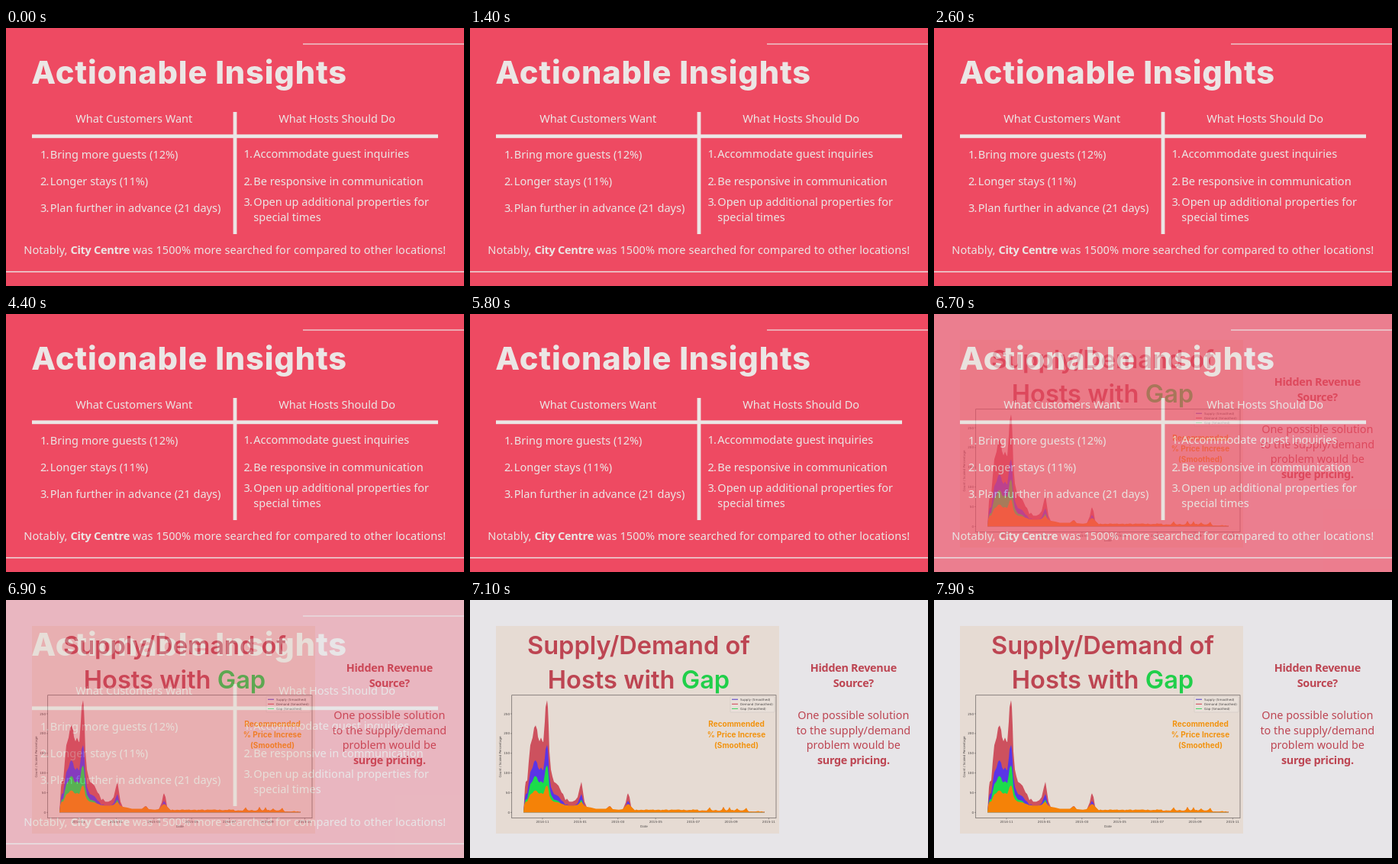
These frames come from a looping animation (600x338 px, 8 s). An HTML page:

```html
<!DOCTYPE html>
<html lang="en">
<head>
<meta charset="utf-8">
<title>Actionable Insights</title>
<style>
  html, body { margin: 0; width: 100%; height: 100%; overflow: hidden; background: #ee4a62; }
  svg { display: block; width: 100vw; height: 100vh; }
  text { white-space: pre; }
  .body { font: 14.55px "Noto Sans", "Open Sans", sans-serif; }
  .aside { font-size: 14.4px; }
  .number { letter-spacing: -.8px; }
  .bold { font-weight: 700; letter-spacing: -.02em; }
  .head { font: 800 41.5px Inter, sans-serif; letter-spacing: .85px; }
  .chart-head { font: 600 32.6px Inter, sans-serif; }
  .note { font: 700 10px Inter, sans-serif; }
  .tiny { font: 4.1px "DejaVu Sans", sans-serif; }
  .mid { text-anchor: middle; }
  .end { text-anchor: end; }
</style>
</head>
<body>
<svg id="stage" viewBox="0 0 600 338">
  <g id="insights">
    <rect width="600" height="338" fill="#ee4a62"/>
    <g fill="#ebe6e5">
      <rect x="389" y="20.4" width="211" height="1.2"/>
      <rect y="318.7" width="600" height="1.4"/>
      <rect x="34" y="139.4" width="532" height="4.8"/>
      <rect x="297.6" y="110" width="4.8" height="160"/>
    </g>
  </g>
  <g id="revenue" opacity="0">
    <rect width="600" height="338" fill="#e7e5e8"/>
    <rect x="34" y="34" width="371" height="272" fill="#e6dbd3"/>
    <g id="chart"></g>
  </g>
</svg>
<script>
const NS = 'http://www.w3.org/2000/svg';
const LOOP = 8000, STEP = 100;
const FADE_START = 6520, FADE_END = 7060;
const LIGHT = '#ebe6e5', ROSE = '#bd4552', INK = '#4a4646';
const insights = document.getElementById('insights');
const revenue = document.getElementById('revenue');
const chart = document.getElementById('chart');

function add(parent, tag, attrs, content) {
  const node = document.createElementNS(NS, tag);
  for (const key in attrs) node.setAttribute(key, attrs[key]);
  if (content) node.textContent = content;
  parent.appendChild(node);
  return node;
}

function label(parent, content, x, y, cls, fill) {
  return add(parent, 'text', { x, y, class: cls, fill }, content);
}

function buildInsights() {
  const put = (s, x, y, cls = 'body') => label(insights, s, x, y, cls, LIGHT);
  const item = (n, s, x, y) => {
    put(n + '.', x - 12.9, y, 'body number');
    put(s, x, y);
  };
  put('Actionable Insights', 33.2, 73, 'head');
  put('What Customers Want', 167.8, 124, 'body mid');
  put('What Hosts Should Do', 433.7, 124, 'body mid');
  item(1, 'Bring more guests (12%)', 57.8, 170.7);
  item(2, 'Longer stays (11%)', 57.8, 206);
  item(3, 'Plan further in advance (21 days)', 57.8, 241.4);
  item(1, 'Accommodate guest inquiries', 324.3, 170.3);
  item(2, 'Be responsive in communication', 324.3, 205.7);
  item(3, 'Open up additional properties for', 324.3, 233.1);
  put('special times', 324.3, 252.5);

  const line = put('', 299.8, 296.4, 'body mid');
  line.style.letterSpacing = '.07px';
  add(line, 'tspan', {}, 'Notably, ');
  add(line, 'tspan', { class: 'bold' }, 'City Centre');
  add(line, 'tspan', {}, ' was 1500% more searched for compared to other locations!');
}

// Demand outline as x, height above the zero line
const demand = [
  70, 0, 71, 16, 72, 33, 73, 40, 75, 42, 77, 67, 79, 88, 82, 98, 84, 111, 86, 114,
  88, 108, 89, 99, 91, 93, 93, 98, 95, 93, 96, 92, 98, 119, 99, 138, 101, 147, 102, 138,
  103, 113, 104, 80, 106, 56, 108, 47, 110, 40, 113, 38, 116, 35, 120, 26, 122, 24,
  125, 16, 127, 18, 130, 14, 134, 14, 138, 16, 141, 20, 144, 33, 146, 40, 148, 27,
  150, 14, 153, 7, 158, 5.5, 165, 4, 178, 4, 182, 8, 184, 8, 187, 3.5, 195, 3,
  200, 3.5, 204, 13, 206, 23, 207, 25, 209, 20, 211, 8, 214, 4
];

function outline() {
  const pts = [];
  for (let i = 0; i < demand.length; i += 2) pts.push([demand[i], demand[i + 1]]);
  const bumps = [[314, 4], [332, 5], [340, 3.5], [350, 2], [362, 3]];
  let seed = 7;
  for (let x = 216; x <= 386; x += 2) {
    seed = (seed * 16807) % 2147483647;
    const noise = (seed / 2147483647 - .5) * 1.1;
    const base = x < 300 ? 2.8 : x < 364 ? 2.2 : 1;
    const bump = bumps.reduce((sum, [c, h]) => sum + h * Math.exp(-(((x - c) / 1.6) ** 2)), 0);
    pts.push([x, Math.max(.4, base + noise + bump)]);
  }
  return pts;
}

function area(pts, height, fill) {
  const top = pts.map(([x, h]) => `L${x} ${(278.3 - height(h)).toFixed(2)}`).join('');
  add(chart, 'path', { d: `M70 278.3${top}L386 278.3Z`, fill });
}

function buildChart() {
  const put = (s, x, y, cls, fill = INK) => label(chart, s, x, y, cls, fill);
  put('Supply/Demand of', 221, 70.5, 'chart-head mid', ROSE);
  const second = put('', 221, 115.5, 'chart-head mid', ROSE);
  add(second, 'tspan', {}, 'Hosts with ');
  add(second, 'tspan', { fill: '#20cf4a' }, 'Gap');

  const pts = outline();
  area(pts, h => h, '#cd515e');
  area(pts, h => h * .6, '#5a35e6');
  area(pts, h => h * .42, '#1bdc4c');
  area(pts, h => h * .2 + Math.min(6, h), '#f58207');

  add(chart, 'rect', { x: 54.7, y: 124.7, width: 346.3, height: 161, fill: 'none', stroke: '#655f5d', 'stroke-width': .7 });
  for (let i = 0; i < 6; i++) {
    const y = 278.3 - i * 25.85;
    add(chart, 'path', { d: `M53 ${y}h1.7`, stroke: INK, 'stroke-width': .5 });
    put(String(i * 50), 52, y + 1.5, 'tiny end');
  }
  ['2014-11', '2015-01', '2015-03', '2015-05', '2015-07', '2015-09', '2015-11'].forEach((s, i) => {
    const x = 95 + i * 49.4;
    add(chart, 'path', { d: `M${x} 285.7v1.7`, stroke: INK, 'stroke-width': .5 });
    put(s, x, 291.8, 'tiny mid');
  });
  put('Date', 228, 297.6, 'tiny mid');
  put('Count / Scaled Percentage', 0, 0, 'tiny mid').setAttribute('transform', 'translate(41 205.5) rotate(-90)');

  add(chart, 'rect', { x: 341, y: 126.5, width: 58, height: 20.5, rx: .8, fill: '#e9e0d9', stroke: '#cbc2bd', 'stroke-width': .5 });
  [['Supply', '#4a35c8'], ['Demand', '#cd3f50'], ['Gap', '#35d45c']].forEach(([name, stroke], i) => {
    const y = 130.2 + i * 6.1;
    add(chart, 'path', { d: `M343 ${y}h8`, stroke, 'stroke-width': 1 });
    put(name + ' (Smoothed)', 354, y + 1.5, 'tiny');
  });

  ['Recommended', '% Price Increse', '(Smoothed)'].forEach((s, i) =>
    put(s, 349, 166.2 + i * 14, 'note mid', '#f2930f'));
}

function buildAside() {
  const put = (s, y, cls = '') => label(revenue, s, 502.3, y, 'body aside mid ' + cls, ROSE);
  put('Hidden Revenue', 94.3, 'bold');
  put('Source?', 113.8, 'bold');
  put('One possible solution', 156.4);
  put('to the supply/demand', 175.9);
  put('problem would be', 195.4);
  put('surge pricing.', 214.9, 'bold');
}

function render(time) {
  const t = Math.floor((time % LOOP) / STEP) * STEP;
  const fade = (t - FADE_START) / (FADE_END - FADE_START);
  revenue.setAttribute('opacity', Math.min(1, Math.max(0, fade)));
}

buildInsights();
buildChart();
buildAside();

const start = performance.now();
function tick() {
  render(performance.now() - start);
  requestAnimationFrame(tick);
}
tick();
</script>
</body>
</html>
```
